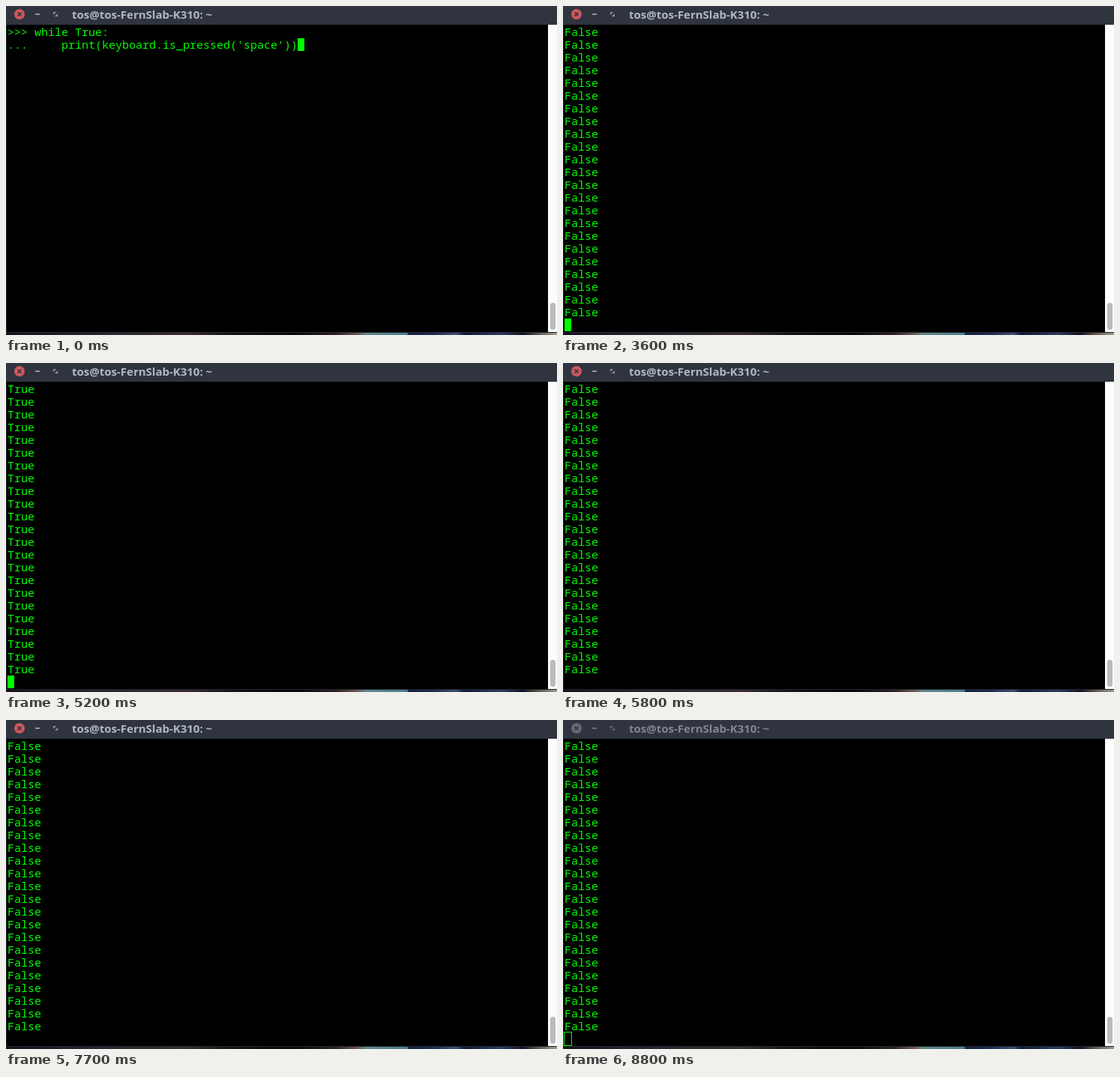
Animation, 735 px wide and 439 px high, one loop 9 s. Source, as an HTML page:

```html
<!DOCTYPE html>
<html lang="en">
<head>
<meta charset="utf-8">
<title>Terminal</title>
<style>
  html, body { margin: 0; width: 100%; height: 100%; overflow: hidden; background: #000; }
  svg { display: block; width: 735px; height: 439px; }
  text { white-space: pre; }
  .mono { font: 15px "Noto Sans Mono", "DejaVu Sans Mono", monospace; fill: #0f0; }
  .title { font: bold 15px "Open Sans", "Noto Sans", sans-serif; }
  .focused { --title: #b0b8c6; --icon: #9096a1; --close: #cc575d; }
  .blurred { --title: #80858f; --icon: #676c77; --close: #666a74; }
  .title { fill: var(--title); }
  .icon { fill: var(--icon); }
  .close { fill: var(--close); }
</style>
</head>
<body>
<svg id="stage" viewBox="0 0 735 439">
  <defs><linearGradient id="desktop"></linearGradient></defs>
  <rect width="735" height="439" fill="#23262e"/>
  <rect x="1" y="25" width="722" height="410" fill="#000"/>
  <rect width="735" height="25" fill="#2f343f"/>
  <rect x="723" y="25" width="12" height="410" fill="#fcfcfc"/>
  <rect x="726" y="396" width="7" height="36" rx="3.5" fill="#b8babf"/>
  <rect y="436" width="735" height="3" fill="url(#desktop)"/>
</svg>
<script>
const LOOP = 9000, CELL = 9, LINE = 17, LEFT = 2, TOP = 26, OUTPUT_ROWS = 23;
const stage = document.getElementById('stage');

function add(parent, tag, attrs = {}, text = '') {
  const el = document.createElementNS('http://www.w3.org/2000/svg', tag);
  for (const key in attrs) el.setAttribute(key, attrs[key]);
  el.textContent = text;
  return parent.appendChild(el);
}

function write(parent, row, text) {
  add(parent, 'text', { class: 'mono', x: LEFT, y: TOP + 14 + row * LINE }, text);
}

function cursor(col, row) {
  return add(stage, 'rect', {
    x: LEFT + col * CELL, y: TOP + row * LINE, width: CELL, height: LINE, fill: '#0f0'
  });
}

function fill(word) {
  const group = add(stage, 'g');
  for (let row = 0; row < OUTPUT_ROWS; row++) write(group, row, word);
  return group;
}

function titleBar(state) {
  const bar = add(stage, 'g', { class: state });
  add(bar, 'circle', { class: 'close', cx: 18, cy: 11, r: 7 });
  add(bar, 'path', { d: 'M15.5 8.5l5 5m0-5l-5 5', stroke: '#2f343f', 'stroke-width': 1.6 });
  add(bar, 'rect', { class: 'icon', x: 39, y: 10, width: 6, height: 2 });
  add(bar, 'path', { class: 'icon', d: 'M63 8h4l-4 4zM69 14h-4l4-4z' });
  add(bar, 'text', { class: 'title', x: 88, y: 17 }, 'tos@tos-FernSlab-K310: ~');
  return bar;
}

// Shows an element only during the given [from, to] spans of the loop.
function show(el, spans) {
  const shownAt = t => spans.some(([from, to]) => from <= t && t < to) ? 1 : 0;
  const times = [...new Set([0, ...spans.flat(), LOOP])];
  const frames = times.map(t => ({
    offset: t / LOOP, opacity: shownAt(t % LOOP), easing: 'steps(1, end)'
  }));
  el.animate(frames, { duration: LOOP, iterations: Infinity });
}

const wallpaper = [
  [0, '#15121d'], [130, '#2a2430'], [240, '#3a2c32'], [300, '#171216'], [385, '#0a0707'],
  [440, '#2d2022'], [470, '#6a5a58'], [480, '#5d8589'], [535, '#4a7f8a'], [537, '#14203f'],
  [570, '#1d2a50'], [600, '#3d5078'], [612, '#0f1830'], [660, '#2a3c66'], [690, '#10131f'],
  [715, '#6f6257'], [735, '#a09a92']
];
for (const [x, color] of wallpaper) {
  add(document.getElementById('desktop'), 'stop', { offset: x / 735, 'stop-color': color });
}

const ENTER = 2600, RUN = 3600, BLUR = 8800;
const pressed = [[4300, 4500], [5200, 5400], [6000, 6300], [7100, 7300], [7900, 8100]];
const edges = [RUN, ...pressed.flat(), LOOP];
const released = edges.flatMap((t, i) => i % 2 ? [] : [[t, edges[i + 1]]]);

const program = add(stage, 'g');
write(program, 0, '>>> while True:');
write(program, 1, "...     print(keyboard.is_pressed('space'))");
show(program, [[0, RUN]]);

const nextPrompt = add(stage, 'g');
write(nextPrompt, 2, '... ');
show(nextPrompt, [[ENTER, RUN]]);

show(fill('False'), released);
show(fill('True'), pressed);

show(cursor(43, 1), [[0, 300], [900, 1500], [2100, ENTER]]);
show(cursor(4, 2), [[ENTER, 3200]]);
show(cursor(0, OUTPUT_ROWS),
  [[RUN, 4200], [4300, 4900], [5200, 5800], [6000, 6600], [7100, 7700], [7900, 8600]]);
show(add(stage, 'rect', {
  x: 1.5, y: 416.5, width: 10, height: 18, fill: 'none', stroke: '#0f0'
}), [[BLUR, LOOP]]);

show(titleBar('focused'), [[0, BLUR]]);
show(titleBar('blurred'), [[BLUR, LOOP]]);
</script>
</body>
</html>
```
